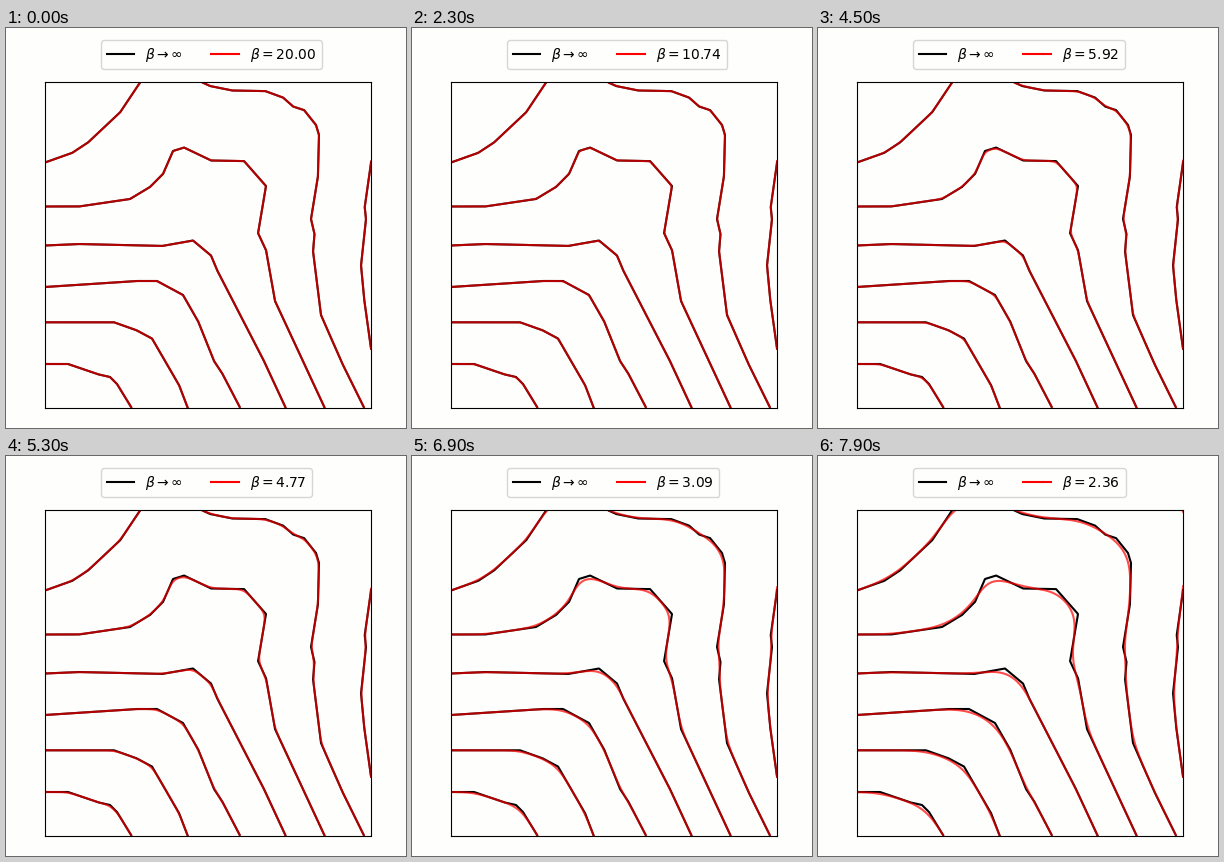
A matplotlib script for the animation above (8000 ms loop, 400x400 px).

```python
import numpy as np
import matplotlib.pyplot as plt
from matplotlib.animation import FuncAnimation
from matplotlib.lines import Line2D

SIZE, FRAMES, INTERVAL = 400, 80, 100
LEFT, RIGHT, TOP, BOTTOM = 39.2, 365.2, 54.2, 380.2
PAPER = "#fefefd"

BETA_START, DECAY = 20.0, 0.02705
SIGMA_END, POWER = 15.0, 1.3      # smoothing width in pixels, growth law
STEP, OVERHANG, REACH = 0.5, 80, 50


def beta_at(i):
    return BETA_START * np.exp(-DECAY * i)


def resample(points):
    """Walk along the polyline evenly, continuing straight past both ends."""
    p = np.array(points, float)
    for end, inner in ((0, 1), (-1, -2)):
        way = p[end] - p[inner]
        p[end] += OVERHANG * way / np.hypot(*way)
    arc = np.r_[0, np.cumsum(np.hypot(*np.diff(p, axis=0).T))]
    s = np.arange(0, arc[-1], STEP)
    return np.array([np.interp(s, arc, c) for c in p.T])


def soften(path, beta):
    """Round the kinks; a smaller beta gives a wider blur along the curve."""
    sigma = SIGMA_END * (beta_at(FRAMES - 1) / beta) ** POWER
    u = np.arange(-REACH, REACH + STEP, STEP)
    kernel = np.exp(-0.5 * (u / sigma) ** 2)
    kernel /= kernel.sum()
    return np.array([np.convolve(c, kernel, mode="valid") for c in path])


def inside(path):
    x, y = path
    keep = (x >= LEFT) & (x <= RIGHT) & (y >= TOP) & (y <= BOTTOM)
    return np.where(keep, path, np.nan)


# Kinks of each level set, in stage pixels.
kinks = [
    [(39, 336), (62, 336), (92, 346.3), (104, 349), (111, 356), (126, 380.5)],
    [(39, 294.3), (108, 294.3), (130, 302), (146, 310.5), (173, 357),
     (182, 380.5)],
    [(39, 259), (130, 253), (151, 253), (177, 267), (192, 293), (208, 333),
     (216, 345), (234.5, 380.5)],
    [(39, 217.5), (72, 216), (156, 218), (187, 212.5), (205, 227.5),
     (211, 242), (257, 331), (280, 380.5)],
    [(39, 178.5), (73, 178.5), (124, 171), (144, 159), (157, 146), (167, 123),
     (178, 119.5), (205, 132.5), (238, 133), (260, 158), (252, 205),
     (260, 222), (269, 273), (319, 380.5)],
    [(39, 134.5), (66, 125), (82, 114.5), (114, 84.5), (133, 56), (140, 46),
     (178, 46), (204, 58), (226, 62.5), (259, 63), (277, 69.5), (287, 78.5),
     (298, 82), (310, 97), (313, 107), (312, 148), (305, 191), (308.5, 206),
     (307, 223), (315, 287), (336, 335), (358.5, 380.5)],
    [(350, 30), (367, 48), (367.5, 100), (365, 135), (358.7, 179), (360, 191),
     (355, 237), (358, 270), (364.8, 319)],
]
paths = [resample(k) for k in kinks]

fig = plt.figure(figsize=(SIZE / 100, SIZE / 100), dpi=100, facecolor=PAPER)
ax = fig.add_axes([LEFT / SIZE, 1 - BOTTOM / SIZE,
                   (RIGHT - LEFT) / SIZE, (BOTTOM - TOP) / SIZE],
                  facecolor=PAPER)
ax.set(xlim=(LEFT, RIGHT), ylim=(BOTTOM, TOP), xticks=[], yticks=[])

style = dict(lw=1.5, solid_capstyle="butt")
for path in paths:
    ax.plot(*inside(path), color="black", **style)
soft_lines = [ax.plot([], [], color="red", alpha=0.7, **style)[0]
              for _ in paths]

handles = [Line2D([], [], color=c, lw=1.5) for c in ("black", "red")]
legend = fig.legend(handles, [r"$\beta\rightarrow\infty$", r"$\beta=20.00$"],
                    ncol=2, loc="center left", borderaxespad=0, fontsize=10,
                    facecolor=PAPER,
                    bbox_to_anchor=(95 / SIZE, 1 - 26.7 / SIZE))
beta_label = legend.get_texts()[1]


def update(i):
    beta = beta_at(i)
    for line, path in zip(soft_lines, paths):
        line.set_data(*inside(soften(path, beta)))
    beta_label.set_text(rf"$\beta={beta:.2f}$")
    return [*soft_lines, beta_label]


anim = FuncAnimation(fig, update, frames=FRAMES, interval=INTERVAL,
                     repeat=True, repeat_delay=0, blit=False)
plt.show()
```
